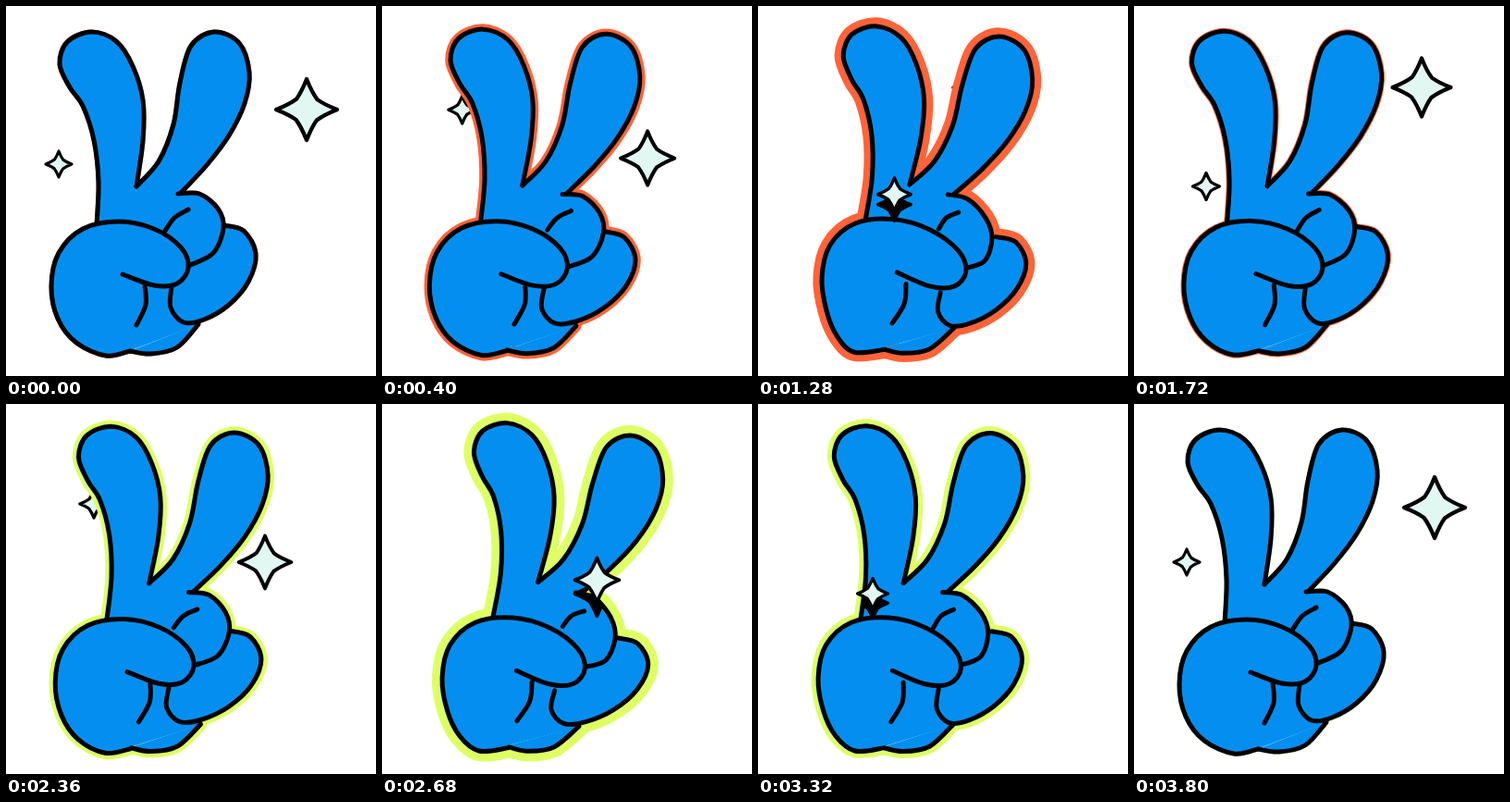
Write an HTML page that moves like this. It is 400x400 px and loops after 3840 ms.

```html
<!DOCTYPE html>
<html lang="en">
<head>
<meta charset="utf-8">
<title>Peace hand</title>
<style>
html, body { margin: 0; width: 100%; height: 100%; overflow: hidden; background: #fff; }
svg { display: block; width: 100vw; height: 100vh; }
</style>
</head>
<body>
<svg id="stage" viewBox="0 0 400 400" stroke-linecap="round" stroke-linejoin="round">
  <defs><clipPath id="handClip"></clipPath></defs>
  <path id="back"/>
  <g id="glow" fill="none"></g>
  <g id="hand"></g>
  <path id="shade" clip-path="url(#handClip)"/>
  <path id="front"/>
</svg>
<script>
const LOOP = 3840, CYCLE = 3800, HALF = CYCLE / 2, STEP = 40;
const BLUE = '#048ff0', PALE = '#e0f7f2', GLOWS = ['#ff6338', '#deff64'];
const SVG = 'http://www.w3.org/2000/svg';
const byId = id => document.getElementById(id);

// Motion rules: how far a resting point shifts at full swing.
const still = () => [0, 0];
const lean = (x, y) => [44 * (1 - (y / 373) ** 1.5), .1 * (x - 165)];
const slide = (x, y) => [(19 + .04 * (x - 125)) * (1 - (y / 375) ** 20), .07 * (x - 150)];
const bend = (x, y) => [.28 * (282 - y) - .1 * (x - 196), 2 + .25 * (x - 190)];
const follow = (x, y) => [.24 * (y - 203), 0];
const curl = (x, y) => [
  .22 * (x - 217) - .17 * (y - 296) - 11,
  .1 * (x - 217) - .1 * (y - 296) + 9
];
const trail = (x, y) => [21.6 - .15 * (x - 217) + .06 * (y - 296), -.06 * (x - 217)];

// Parts from bottom to top: kind, quick motion, late motion, key points.
const parts = [
  ['body', lean, still, [98,237, 141,195, 190,203, 225,240, 205,343, 134,370, 100,300]],
  ['outline', lean, still, [98,237, 100,190, 95,145, 83,108, 69,88, 58,63, 66,39, 92,28,
    119,38, 137,65, 148,102, 148,145, 141,195]],
  ['outline', lean, still, [141,195, 165,168, 181,128, 188,83, 200,43, 225,28, 252,40,
    263,72, 258,105, 241,140, 217,172, 189,202]],
  ['outline', lean, still, [134,373, 157,376, 185,369, 208,344]],
  ['outline', curl, trail, [235,237, 257,243, 270,268, 262,298, 241,323, 214,339,
    192,342, 178,326, 179,303]],
  ['outline', bend, follow, [186,203, 209,203, 229,219, 235,240, 224,267, 197,281]],
  ['crease', bend, follow, [197,220, 182,229, 172,243]],
  ['outline', still, slide, [134,373, 108,378, 76,364, 56,338, 49,303, 57,267, 83,241,
    122,233, 160,241, 189,261, 197,283, 185,300, 160,302, 126,290]],
  ['crease', lean, still, [150,302, 151,323, 141,345]]
].map(([kind, quick, late, flat]) => {
  const pts = [];
  for (let i = 0; i < flat.length; i += 2) pts.push([flat[i], flat[i + 1]]);
  const line = kind === 'body' ? BLUE : '#000';
  const els = [add('hand', kind === 'crease' ? 'none' : BLUE, line)];
  if (kind === 'outline') els.push(add('glow'));
  if (kind !== 'crease') els.push(add('handClip'));
  return { kind, quick, late, pts, els };
});

// Orbit stops: time, x, y. The first half passes in front of the hand.
const orbit = [
  [0, 325, 112], [460, 280, 171], [770, 234, 190], [1420, 124, 205],
  [1720, 78, 195], [HALF, 57, 171], [2360, 95, 108], [3620, 311, 88]
];

function add(parent, fill, stroke) {
  const el = document.createElementNS(SVG, 'path');
  if (fill) el.setAttribute('fill', fill);
  if (stroke) {
    el.setAttribute('stroke', stroke);
    el.setAttribute('stroke-width', 5);
  }
  return byId(parent).appendChild(el);
}

const fmt = p => p.map(v => v.toFixed(2)).join();

// Smooth open curve through points.
function curve(pts) {
  const at = i => pts[Math.max(0, Math.min(pts.length - 1, i))];
  const handle = (i, dir) => at(i).map((v, k) => v + dir * (at(i + 1)[k] - at(i - 1)[k]) / 6);
  let d = 'M' + fmt(pts[0]);
  for (let i = 1; i < pts.length; i++) {
    d += `C${fmt(handle(i - 1, 1))} ${fmt(handle(i, -1))} ${fmt(pts[i])}`;
  }
  return d;
}

const wave = t => (1 - Math.cos(2 * Math.PI * t / HALF)) / 2;

function drawPart({ kind, quick, late, pts, els }, sway, lag) {
  const moved = pts.map(([x, y]) => {
    const q = quick(x, y), l = late(x, y);
    return [x + q[0] * sway + l[0] * lag, y + q[1] * sway + l[1] * lag];
  });
  const d = kind === 'body' ? 'M' + moved.map(fmt).join('L') + 'Z' : curve(moved);
  for (const el of els) el.setAttribute('d', d);
}

function stop(i) {
  const n = orbit.length, turn = Math.floor(i / n);
  const [t, x, y] = orbit[i - turn * n];
  return [t + turn * CYCLE, x, y];
}

// Smooth periodic path through the stops; stars grow towards the right.
function orbitAt(time) {
  const t = time % CYCLE;
  let i = orbit.length - 1;
  while (orbit[i][0] > t) i--;
  const [a, b, c, d] = [-1, 0, 1, 2].map(k => stop(i + k));
  const h = c[0] - b[0], u = (t - b[0]) / h;
  const [x, y] = [1, 2].map(k => {
    const m0 = (c[k] - a[k]) / (c[0] - a[0]) * h;
    const m1 = (d[k] - b[k]) / (d[0] - b[0]) * h;
    const e = c[k] - b[k];
    return b[k] + u * (m0 + u * (3 * e - 2 * m0 - m1 + u * (m0 + m1 - 2 * e)));
  });
  return [x, y, 13.8 + 19.2 * ((x - 40) / 285) ** 1.6];
}

function drawStar(id, [x, y, r], fill) {
  let d = '';
  for (let k = 0; k < 4; k++) {
    const a = k * Math.PI / 2, c = Math.cos(a), s = Math.sin(a);
    const at = (px, py) => fmt([x + r * (px * c - py * s), y + r * (px * s + py * c)]) + ' ';
    d += (k ? 'L' : 'M') + at(0, -1) + 'Q' + at(.17, -.57) + at(.35, -.33)
      + 'Q' + at(.57, -.17) + at(1, 0);
  }
  const el = byId(id);
  el.setAttribute('d', d + 'Z');
  el.setAttribute('fill', fill);
  el.setAttribute('stroke', '#000');
  el.setAttribute('stroke-width', 2.3 + r * .06);
}

function draw(time) {
  const t = Math.floor(time % LOOP / STEP) * STEP;
  const swing = wave(t - 15);
  const sway = swing / .9, lag = (wave(t - 150) - .06) / .67;
  for (const part of parts) drawPart(part, sway, lag);

  const glow = byId('glow');
  glow.setAttribute('stroke', GLOWS[t < HALF ? 0 : 1]);
  glow.setAttribute('stroke-width', 5 + 19 * swing);

  const near = orbitAt(t % HALF), far = orbitAt(t % HALF + HALF);
  const [x, y, r] = near;
  drawStar('front', near, PALE);
  drawStar('back', far, PALE);
  drawStar('shade', [x, y + r * .62, r], '#000');
}

function tick(now) {
  draw(now);
  requestAnimationFrame(tick);
}
draw(0);
requestAnimationFrame(tick);
</script>
</body>
</html>
```
